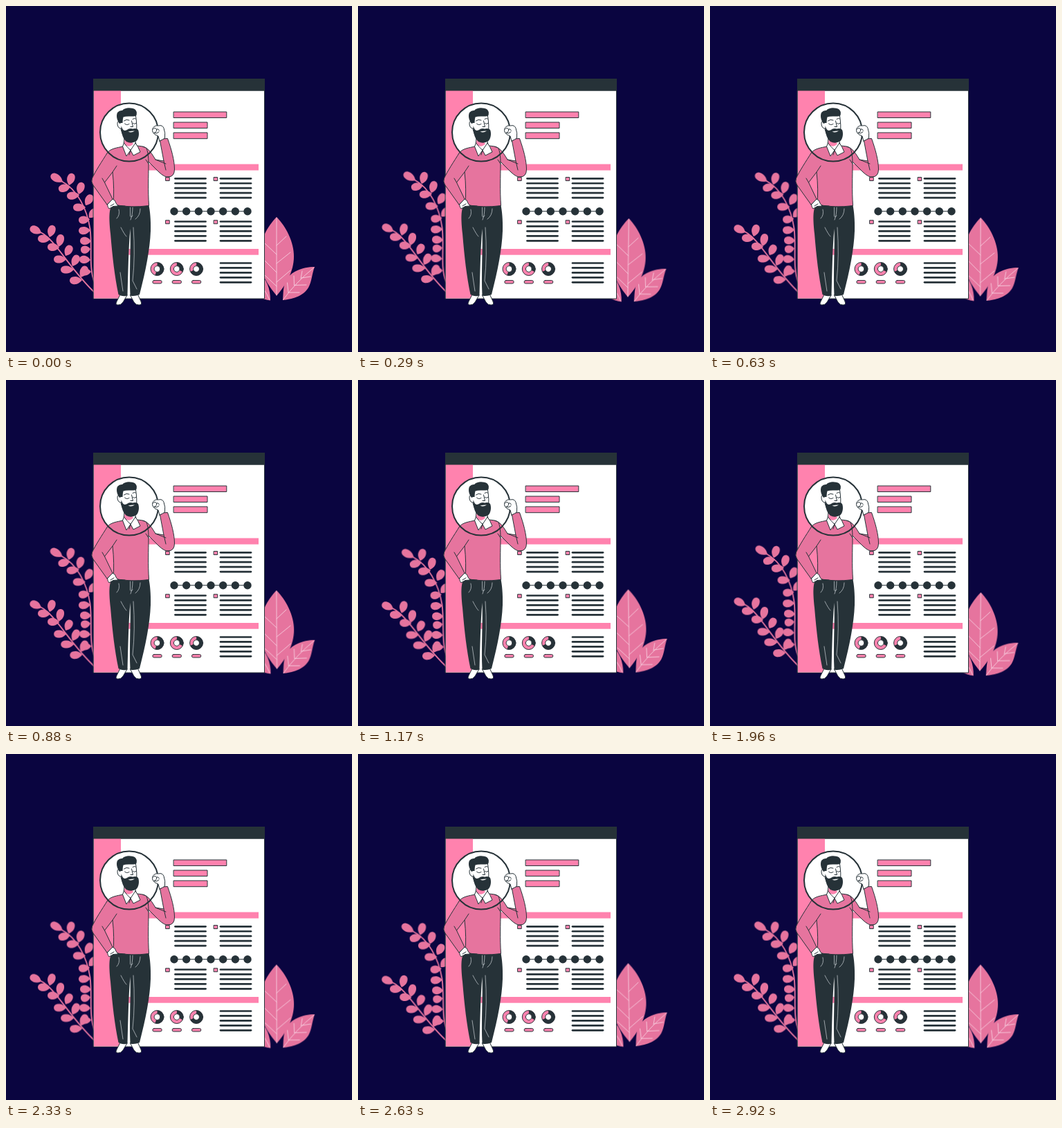
These frames come from a looping animation (500x500 px, 2.96 s). An HTML page:

```html
<!DOCTYPE html>
<html lang="en">
<head>
<meta charset="utf-8">
<title>Resume under the magnifier</title>
<style>
  html, body { margin: 0; width: 100%; height: 100%; overflow: hidden; background: #0a0540; }
  svg { display: block; width: 100vw; height: 100vh; }
  .ink { fill: #263238; }
  .pink { fill: #ff82ae; }
  .rose { fill: #e6749e; }
  .white { fill: #fff; }
  .edge { stroke: #263238; stroke-width: 1; stroke-linejoin: round; stroke-linecap: round; }
  .line { fill: none; stroke: #263238; stroke-width: 1; stroke-linecap: round; stroke-linejoin: round; }
  .text { fill: none; stroke: #263238; stroke-width: 2.7; stroke-linecap: round; }
  .vein { fill: none; stroke: #f8cfdf; stroke-width: .9; stroke-linecap: round; }
  .stem { fill: none; stroke: #e6749e; stroke-width: 1.8; stroke-linecap: round; }
  .crease { fill: none; stroke: #cfd5d8; stroke-width: .7; stroke-linecap: round; }

  #plants { transform-origin: 241px 335px; animation: sway 2960ms linear infinite; }
  /* 1500 ms swings, cut slightly before the second one ends */
  @keyframes sway {
    0%      { transform: rotate(0deg); }
    12.669% { transform: rotate(1deg); }
    38.007% { transform: rotate(-1deg); }
    63.345% { transform: rotate(1deg); }
    88.682% { transform: rotate(-1deg); }
    100%    { transform: rotate(-.107deg); }
  }
</style>
</head>
<body>
<svg viewBox="0 0 500 500">
  <g id="plants">
    <g id="sprigs">
      <path class="stem" d="M80 253C103 265 117 293 121.500 322C125 348 119 378 128 400"/>
      <path class="stem" d="M50 327C72 338 90 378 129 415"/>
    </g>
    <path class="rose" d="M382 425.500C382 409 377 393 363 384C355 380 346 378 340 378C342 402 356 422 382 425.500Z"/>
    <path class="vein" d="M380.500 424Q374 408 362 397"/>
    <path class="rose" d="M391 305C404 318 416 340 416 362C416 385 403 405 391 418.500C378 403 366 385 366 360C366 340 378 318 391 305Z"/>
    <path class="vein" d="M391 306V418M391 346L405 333M391 372L411 356M391 399L411 382M391 359L374 343M391 385L370 364M391 405L374 389"/>
    <path class="rose" d="M446 377C428 377 411 384 404.500 397C400 406 401 416 400 425C412 424 429 420 437 407C442 398 442 387 446 377Z"/>
    <path class="vein" d="M400.500 424.500Q419 399 445 378M408 414L406.500 400M416.500 403.500L416 390M426 394L428 383M408 414L424 414M417 403.500L434 403M427 393L440 391"/>
  </g>

  <g id="page">
    <rect class="white edge" x="126.500" y="122" width="247" height="301"/>
    <rect class="pink" x="127" y="122" width="39" height="300.500"/>
    <rect class="ink" x="126" y="105" width="248" height="17.500"/>
    <rect class="pink" x="177" y="228.500" width="188" height="9"/>
    <rect class="pink" x="177" y="351" width="188" height="8.700"/>
    <rect class="pink edge" x="242.500" y="153" width="76.300" height="8.500"/>
    <rect class="pink edge" x="242.500" y="168" width="48.500" height="8.500"/>
    <rect class="pink edge" x="242.500" y="183" width="48.500" height="8.700"/>
    <path class="line" d="M243 296.700H349" stroke-width="1.500"/>
  </g>

  <!-- lens -->
  <circle class="white" cx="178" cy="182.500" r="42"/>

  <!-- shoes and trousers -->
  <path class="white edge" d="M165 417L160 427Q157.500 431.500 161.500 432Q166 432.500 169 428L175 418Z"/>
  <path class="white edge" d="M179.500 418L185 428Q188 432.500 192.500 432Q197 431.500 195 427L190.500 417Z"/>
  <path class="ink" d="M154 287C148 292 149 310 151 329C154 365 157 390 162.500 417Q169 420.500 175.500 418.500C176.500 385 177 350 179.500 322C180.500 350 178 385 179.500 418.500Q186 420 193 417C202 382 208 352 209 325C209.500 308 208 296 206.500 288Z"/>
  <path class="crease" d="M179.500 291V303Q180 307 183 303M183 291Q183 302 180 309M194 293Q194 303 187 308M163 294Q165 302 160 307M184 320Q187 360 183 397L189 409M166 320Q171 330 174 333M165 385L169 412"/>

  <!-- head -->
  <path class="white edge" d="M171 190L170 204Q177 218 189 204L186 192Z"/>
  <path class="pink" d="M171.500 192L171 200Q178 206 184 199L180 194Z"/>
  <path class="white edge" d="M166 158C164 168 165 180 170 188Q179 198 188 189C189.500 178 189 166 187 156Z"/>
  <path class="white edge" d="M166.500 168Q160.500 164 161 171Q162 178 167.500 177"/>
  <path class="ink" d="M166.500 169L164 170C160 165 159 158 161 154Q164 150.500 168 151C172 146 181 146.500 186 149Q190 152 188.500 158Q187 160 181 159.500Q173 159 169.500 160.500Q168.500 164 168.500 169Z"/>
  <path class="ink" d="M166.500 173C168.500 179 170 181 174 179.500Q179 176 183 177.500Q189 176 191 179C193 184 192 192 188 195.500Q181 199.500 174 196C168 191 166.500 182 166.500 173Z"/>
  <path class="white" d="M176.500 181.500Q181 184 186 180.500Q182 180.500 176.500 181.500Z"/>
  <path class="line" d="M171.500 170Q174.500 173 178 170.500M183.500 169.500Q185.500 171.500 188 169.500M181.500 166L183.500 174.500L180 174.500"/>
  <path class="line" stroke-width="1.800" d="M170.500 166Q174 163 178 165M183 163.500Q185.500 161.500 187.500 163"/>

  <!-- raised arm -->
  <path class="rose edge" d="M198 203C207 206 211 214 216 222L228 224L222.500 195Q227 190.500 233.500 191.500C239 207 243.500 223 243.500 236Q243.500 247 234 247Q229 247.500 221 240L203 222Z"/>
  <path class="line" d="M228 224L231 237M216 222L231 228"/>

  <!-- torso and arm on the hip -->
  <path class="rose edge" d="M169 203C160 205 151 206 146.500 212C139 224 129 239 124.500 249Q122.500 254 126 259L146 287L154 279L142.500 255L154 240C156 257 156 273 155 287Q181 292 206.500 288.500C205 266 206 247 206 228Q206 211 202.500 205Q196 202 190 202Q180 213 169 203Z"/>
  <path class="line" d="M154 240L160 231M142.500 255L139 249M206 228L202 222M155 287Q163 289 172 289"/>
  <path class="white edge" d="M146.500 287L154 279Q158 280 159 285L162 289L155 289.500L149 293Q147 291 146.500 287Z"/>
  <path class="line" d="M151 289L156 286"/>

  <!-- collar -->
  <path class="white edge" d="M170.500 198L168.500 203L174 217L180 208.500Q175 204 170.500 198Z"/>
  <path class="white edge" d="M187 198L180 208.500L184 216L194 211Q191 203 187 198Z"/>
  <path class="line" d="M180 208.500L178 215"/>

  <circle class="line" cx="178" cy="182.500" r="42" style="stroke-width:2"/>

  <!-- fist -->
  <path class="white edge" d="M222 195L220 188Q213.500 186 212 182Q210.500 177 214 174.500Q216.500 172 220.500 173Q226 171.500 228 176.500Q230.500 183 229.500 191Q226 193.500 222 195Z"/>
  <path class="line" d="M212.500 178Q215 175 217.500 178Q218.500 182 214 183.500M217.500 178Q220 176.500 221.500 180M214 183.500Q218 185 221 182"/>
</svg>
<script>
  const NS = "http://www.w3.org/2000/svg";
  const page = document.getElementById("page");
  const sprigs = document.getElementById("sprigs");

  function add(parent, tag, attrs) {
    const node = document.createElementNS(NS, tag);
    for (const key in attrs) node.setAttribute(key, attrs[key]);
    parent.append(node);
  }

  // Teardrop from its joint to its round end
  function leaf([x, y, tx, ty]) {
    const len = Math.hypot(tx - x, ty - y);
    const turn = Math.atan2(ty - y, tx - x) * 180 / Math.PI;
    add(sprigs, "path", {
      class: "rose",
      d: `M0 0C${len * .3} -6 ${len * .55} -6 ${len * .75} -5.200C${len * 1.08} -4 ${len * 1.08} 4 ${len * .75} 5.200C${len * .55} 6 ${len * .3} 6 0 0Z`,
      transform: `translate(${x} ${y}) rotate(${turn})`
    });
  }

  [[82, 254, 65, 244], [91, 259, 96, 242], [93, 261, 76, 265], [105, 272, 110, 255],
   [106, 273, 88, 275], [115, 288, 124, 273], [115, 291, 97, 291], [120, 306, 131, 294],
   [121, 308, 105, 310], [122, 324, 105, 325], [123, 340, 107, 339], [122, 351, 108, 353],
   [122, 367, 106, 366], [123, 384, 107, 384],
   [51, 328, 35, 320], [63, 334, 68, 317], [64, 337, 46, 336], [76, 348, 80, 330],
   [77, 349, 60, 348], [86, 361, 94, 346], [87, 366, 69, 366], [96, 376, 104, 360],
   [98, 381, 79, 381], [108, 392, 116, 376], [110, 396, 92, 397]].forEach(leaf);

  function lines(x, y) {
    for (let i = 0; i < 5; i++)
      add(page, "path", { class: "text", d: `M${x + 1} ${y + i * 6.95}h44` });
  }

  for (const y of [249.3, 311.500]) {
    for (const x of [231, 300.500]) {
      add(page, "rect", { class: "pink edge", x, y: y - 1.800, width: 5.200, height: 5 });
    }
    lines(243.500, y);
    lines(309, y);
  }
  lines(309, 371.500);

  for (let i = 0; i < 7; i++)
    add(page, "circle", { class: "ink", cx: 243 + i * 17.67, cy: 296.700, r: 5.700 });

  // Ring charts: dark share runs clockwise from the top
  [.55, .32, .68].forEach((share, i) => {
    const cx = 218.500 + i * 28.300, cy = 380, r = 7;
    const around = 2 * Math.PI * r;
    const ring = { cx, cy, r, fill: "none", "stroke-width": 5 };
    add(page, "circle", { ...ring, stroke: "#ff82ae" });
    add(page, "circle", {
      ...ring, stroke: "#263238",
      "stroke-dasharray": `${around * share} ${around}`,
      transform: `rotate(-90 ${cx} ${cy})`
    });
    for (const edge of [4.400, 9.500]) add(page, "circle", { class: "line", cx, cy, r: edge });
    add(page, "rect", { class: "pink edge", x: cx - 6.700, y: 396.600, width: 13.400, height: 4.400, rx: 2.200 });
  });
</script>
</body>
</html>
```
